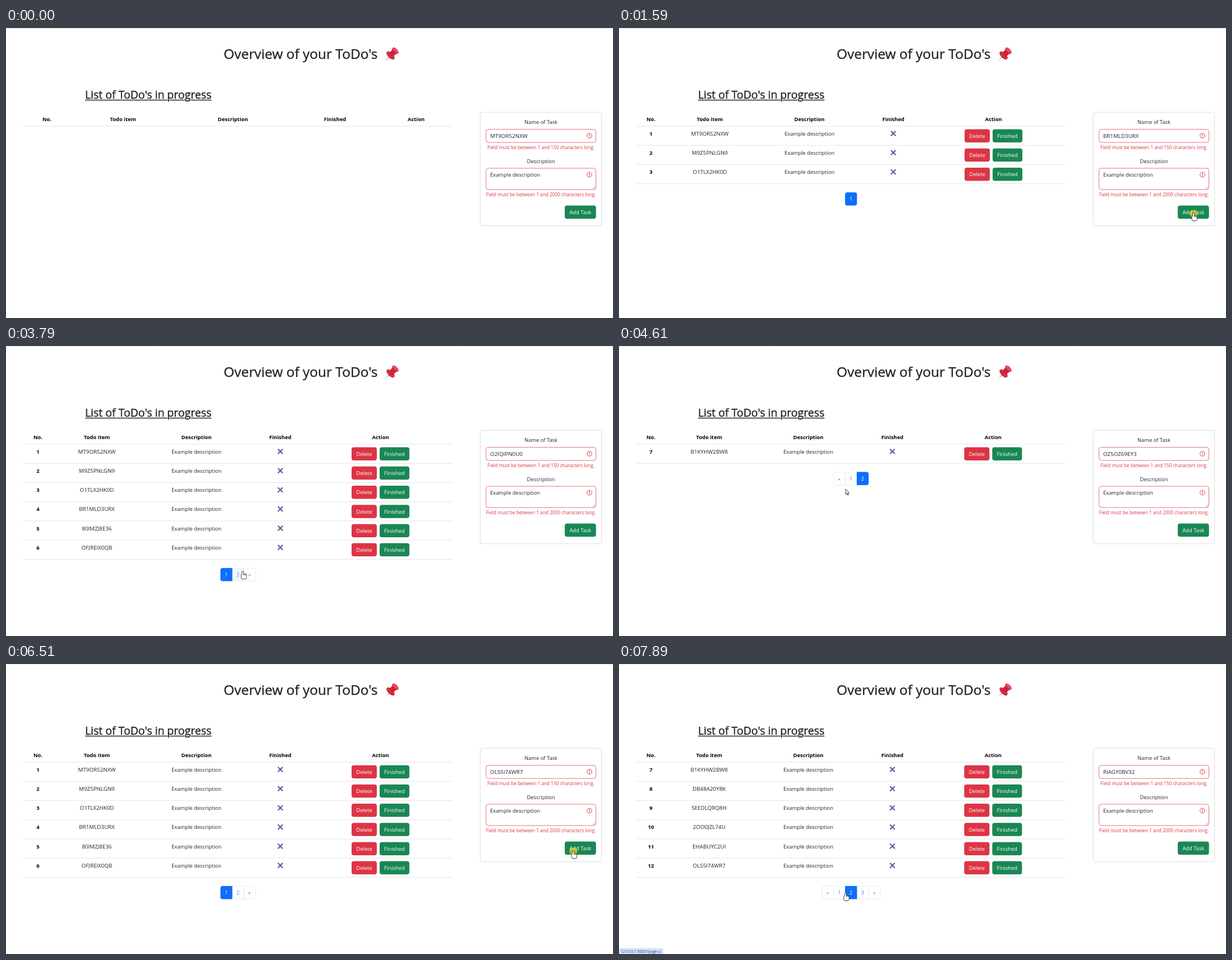
Recreate the animation shown at these times as an HTML page with a canvas. Size 1082 by 517 pixels, loop 8 s.

```html
<!DOCTYPE html>
<html lang="en">
<head>
<meta charset="utf-8">
<title>ToDo overview</title>
<style>
  html, body { margin: 0; width: 100%; height: 100%; overflow: hidden; background: #fff; }
  canvas { display: block; width: 1082px; height: 517px; }
</style>
</head>
<body>
<canvas id="stage"></canvas>
<script>
const W = 1082, H = 517, LOOP = 8000;
const INK = '#212529', RED = '#dc3545', GREEN = '#198754', BLUE = '#0d6efd', LINE = '#e2e5e9';
const FONT = '"Open Sans", "Noto Sans", sans-serif';
const ROW = 34.22, TOP = 175, PER_PAGE = 6, LINK = 20.8, LINK_MID = 413.4, BUTTON_H = 23.5;
const LOAD_DELAY = 65, FLASH = 125;
const ADD = { x: 996, y: 316.6, w: 55.7, h: BUTTON_H };

const canvas = document.getElementById('stage');
const ctx = canvas.getContext('2d');
const ratio = window.devicePixelRatio || 1;
canvas.width = Math.round(W * ratio);
canvas.height = Math.round(H * ratio);

// Every page load puts the next code into the form.
const codes = ('MT9OR52NXW M9Z5PNLGN9 O1TLX2HK0D BR1MLD3URX 80IMZJ8E36 OFJREIX0QB ' +
  'B1KYHW2BW8 O2IQIPN0U0 OZ5OZ69EY3 DB48A20Y8K SEEDLQRQ8H 2OO0JZL74U EHABUYC2UI ' +
  'OLS5I74WR7 K7QW3ZP1TM X4HN8RE20V RIAGY0BV32').split(' ');

const burst = (start, step, n) => Array.from({ length: n }, (_, i) => start + step * i);
const adds = [1190, ...burst(1455, 66, 3), 1790, 2130, 2587, ...burst(5900, 152, 5), 6715];
const clicks = [
  ...adds.map(at => ({ at })),
  { at: 3990, page: 2 }, { at: 4800, page: 1 }, { at: 7670, page: 2 }
].sort((a, b) => a.at - b.at);

// Pointer moves, each bent towards a "via" point.
const moves = [
  { from: 320, to: 1120, end: [1024, 330], via: [1046, 400] },
  { from: 3100, to: 3900, end: [416, 402], via: [720, 380] },
  { from: 4250, to: 4740, end: [411, 236], via: [360, 371] },
  { from: 4880, to: 5000, end: [448, 261], via: [430, 248] },
  { from: 5000, to: 5780, end: [1011, 333], via: [800, 435] },
  { from: 6800, to: 7480, end: [403.6, 408], via: [700, 450] }
];

const ease = u => u < 0.5 ? 4 * u ** 3 : 1 - 4 * (1 - u) ** 3;

function pointerAt(t) {
  let pos = [1047, 491];
  for (const m of moves) {
    if (t < m.from) break;
    const s = ease(Math.min(1, (t - m.from) / (m.to - m.from))), r = 1 - s;
    pos = pos.map((p, k) => r * r * p + 2 * r * s * m.via[k] + s * s * m.end[k]);
  }
  return pos;
}

const distance = (a, b) => Math.hypot(a[0] - b[0], a[1] - b[1]);
const inside = ([px, py], { x, y, w, h }) => px >= x && px <= x + w && py >= y && py <= y + h;

// Page contents after the first n loads.
function pageAfter(n) {
  const tasks = [];
  let page = 1;
  clicks.slice(0, n).forEach((c, i) => {
    if (!c.page) tasks.push(codes[i]);
    page = c.page || 1;
  });
  const first = (page - 1) * PER_PAGE;
  const rows = tasks.slice(first, first + PER_PAGE);
  return { page, first, rows, links: linksFor(page, tasks.length, rows.length), name: codes[n] };
}

function linksFor(page, count, shown) {
  const pages = Math.ceil(count / PER_PAGE);
  const links = burst(1, 1, pages).map(n => ({ label: String(n), page: n, active: n === page }));
  if (page > 1) links.unshift({ label: '«', page: page - 1 });
  if (page < pages) links.push({ label: '»', page: page + 1 });
  return links.map((link, i) => ({
    ...link, x: LINK_MID + (i - links.length / 2) * LINK,
    y: TOP + ROW * shown + 15.4, w: LINK, h: BUTTON_H
  }));
}

function rowButtons(i, mid) {
  const y = TOP + ROW * i + 5.5;
  return [
    { label: 'Delete', x: mid - 51.5, y, w: 45, h: BUTTON_H, fill: RED, dark: '#bb2d3b' },
    { label: 'Finished', x: mid - 1.5, y, w: 53, h: BUTTON_H, fill: GREEN, dark: '#157347' }
  ];
}

function stateAt(t) {
  const loads = clicks.filter(c => c.at + LOAD_DELAY <= t).length;
  const last = clicks.filter(c => c.at <= t).pop();
  const page = pageAfter(loads), pos = pointerAt(t);
  const loadTime = loads ? clicks[loads - 1].at + LOAD_DELAY : 0;
  // A still pointer keeps its look from before the load.
  const moved = distance(pos, pointerAt(loadTime)) > 1;
  const felt = moved ? page : pageAfter(loads - 1);
  const visible = t >= 320;
  return {
    ...page, pos, visible, live: visible && moved,
    link: visible && felt.links.find(l => inside(pos, l)),
    slow: distance(pos, pointerAt(t - 60)) < 12,
    flash: last && t - last.at < FLASH
  };
}

function text(str, x, y, size, color = INK, align = 'center', weight = 400) {
  ctx.font = `${weight} ${size}px ${FONT}`;
  ctx.textAlign = align;
  ctx.fillStyle = color;
  ctx.fillText(str, x, y);
}

function outline(str, x, y, color, width) {
  ctx.strokeStyle = color;
  ctx.lineWidth = width;
  ctx.strokeText(str, x, y);
}

function box(x, y, w, h, r, fill, stroke, width = 1) {
  ctx.beginPath();
  ctx.roundRect(x, y, w, h, r);
  if (fill) { ctx.fillStyle = fill; ctx.fill(); }
  if (stroke) { ctx.strokeStyle = stroke; ctx.lineWidth = width; ctx.stroke(); }
}

function line(x1, y1, x2, y2, color, width = 1) {
  ctx.beginPath();
  ctx.moveTo(x1, y1);
  ctx.lineTo(x2, y2);
  ctx.strokeStyle = color;
  ctx.lineWidth = width;
  ctx.stroke();
}

function shape(points, fill) {
  ctx.beginPath();
  points.forEach(([x, y]) => ctx.lineTo(x, y));
  ctx.closePath();
  ctx.fillStyle = fill;
  ctx.fill();
}

function ellipse(x, y, rx, ry, fill) {
  ctx.beginPath();
  ctx.ellipse(x, y, rx, ry, 0, 0, Math.PI * 2);
  ctx.fillStyle = fill;
  ctx.fill();
}

function button(s, b) {
  const hot = s.live && inside(s.pos, b);
  if (hot) s.hand = true;
  box(b.x, b.y, b.w, b.h, 4, hot ? b.dark : b.fill);
  text(b.label, b.x + b.w / 2, b.y + 15.4, 9.4, '#fff');
}

function pin() {
  ctx.save();
  ctx.translate(687, 47.5);
  ctx.rotate(Math.PI / 4);
  shape([[-1, 4], [1, 4], [0, 16]], '#a9adb5');
  ellipse(0, 2.6, 9, 4, '#b81b33');
  ellipse(0, 1.4, 9, 3.8, '#dd2e44');
  shape([[-4.5, 2], [4.5, 2], [5.5, -10], [-5.5, -10]], '#c9243c');
  ellipse(0, -9.8, 7, 3.4, '#c9243c');
  ellipse(0, -10.8, 6.8, 3, '#f0475b');
  ctx.restore();
}

// A thin outline gives the titles their medium weight.
function title(str, x, y, size) {
  text(str, x, y, size, INK, 'left');
  outline(str, x, y, INK, 0.4);
}

function headings() {
  line(0, 0.5, W, 0.5, '#e6e6e6');
  title("Overview of your ToDo's", 388, 55, 24.4);
  pin();
  const list = "List of ToDo's in progress", x = 141, y = 125.6, size = 19.45;
  text(list, x, y, size, INK, 'left');
  line(x, 128.5, x + ctx.measureText(list).width, 128.5, INK, 1.3);
  outline(list, x, y, '#fff', 2.4);
  title(list, x, y, size);
}

function columns(s) {
  if (!s.rows.length) return [73, 208.5, 404.5, 586.5, 731];
  const squeeze = s.page > 1 ? 2 : 0;
  return [57, 162, 339.5, 489, 667.5].map((x, i) => x - squeeze * Math.sin(i * 0.7));
}

function table(s) {
  const cols = columns(s);
  ['No.', 'Todo item', 'Description', 'Finished', 'Action'].forEach((label, i) =>
    text(label, cols[i], 165.8, 9.4, '#000', 'center', 700));
  line(30, TOP, 796, TOP, LINE);
  s.rows.forEach((task, i) => {
    const y = TOP + ROW * i, base = y + 16.8, mid = y + 13, x = cols[3], arm = 4.3;
    text(String(s.first + i + 1), cols[0], base, 9.5, '#000', 'center', 700);
    text(task, cols[1], base, 9.8);
    text('Example description', cols[2], base, 9.4);
    for (const d of [-arm, arm]) line(x - arm, mid - d, x + arm, mid + d, '#585c98', 2.1);
    rowButtons(i, cols[4]).forEach(b => button(s, b));
    line(30, y + ROW, 796, y + ROW, LINE);
  });
}

function pagination(s) {
  const end = s.links.length - 1;
  const draw = (l, i) => {
    const a = i === 0 ? 4 : 0, b = i === end ? 4 : 0, radius = [a, b, b, a];
    const hot = s.link && s.link.label === l.label;
    if (l.active) box(l.x, l.y, l.w + 0.4, l.h, radius, BLUE);
    else box(l.x + 0.4, l.y + 0.4, l.w, l.h - 0.8, radius, hot ? '#f4f6f8' : '#fff', LINE, 0.8);
    text(l.label, l.x + l.w / 2, l.y + 15.3, 9.5, l.active ? '#fff' : '#3d86f5');
  };
  // The active link covers its neighbours' borders.
  for (const active of [false, true])
    s.links.forEach((l, i) => { if (!!l.active === active) draw(l, i); });
}

function field(label, value, y, h, limit, size) {
  const mid = y + 12;
  text(label, 953.5, y - 8.8, 9.4);
  box(855.7, y + 0.6, 195.8, h, 4, '#fff', RED, 0.7);
  text(value, 863, y + 15.6, size, INK, 'left');
  box(1035.7, mid - 4.3, 8.6, 8.6, 4.3, null, RED);
  line(1040, mid - 2.4, 1040, mid + 0.6, RED, 1.2);
  line(1040, mid + 1.4, 1040, mid + 2.5, RED, 1.2);
  text(`Field must be between 1 and ${limit} characters long.`, 953.5, y + h + 13, 8.28, RED);
}

function form(s) {
  box(845.3, 150.2, 216.4, 202.4, 4, '#fff', '#d2d3d4', 0.8);
  field('Name of Task', s.name, 180, 23.4, 150, 9.8);
  field('Description', 'Example description', 249.4, 38, 2000, 9.4);
  for (const d of [2, 4.5]) line(1050.3 - d, 286.8, 1050.3, 286.8 - d, '#888', 0.8);
  button(s, { ...ADD, label: 'Add Task', fill: GREEN, dark: '#157347' });
}

function hand() {
  const parts = [[-2.6, 5, 8.8, 8.6, 3], [-1.1, 0.2, 2.2, 9, 1.1]];
  for (const p of parts) box(...p, null, '#222', 1.6);
  for (const p of parts) box(...p, '#fff');
  for (const x of [1.3, 3.1, 4.8]) line(x, 5.3, x, 7.4, '#222', 0.7);
}

function arrow() {
  shape([[0, 0], [0, 9.4], [2.1, 7.5], [3.5, 10.7], [4.9, 10.1], [3.5, 6.9], [6.3, 6.7]], '#fff');
  ctx.strokeStyle = '#222';
  ctx.lineWidth = 0.9;
  ctx.stroke();
}

function pointer(s) {
  if (!s.visible) return;
  const [x, y] = s.pos;
  if (s.flash) ellipse(x + 0.3, y + 1.2, 7, 7, 'rgba(255,220,0,0.62)');
  ctx.save();
  ctx.translate(x, y);
  if (s.hand || s.link || inside(s.pos, ADD)) hand();
  else arrow();
  ctx.restore();
}

function status(s) {
  if (!s.link || !s.slow) return;
  box(0, 506.5, 79, 11, [0, 3, 0, 0], '#d3e3fd');
  text(`127.0.0.1:5000/?page=${s.link.page}`, 3, 514.8, 6.55, '#34465f', 'left');
}

function draw(t) {
  const s = stateAt(t);
  ctx.setTransform(ratio, 0, 0, ratio, 0, 0);
  ctx.lineJoin = 'round';
  ctx.fillStyle = '#fff';
  ctx.fillRect(0, 0, W, H);
  headings();
  table(s);
  pagination(s);
  form(s);
  status(s);
  pointer(s);
}

const start = performance.now();
function tick() {
  draw((performance.now() - start) % LOOP);
  requestAnimationFrame(tick);
}
tick();
</script>
</body>
</html>
```
